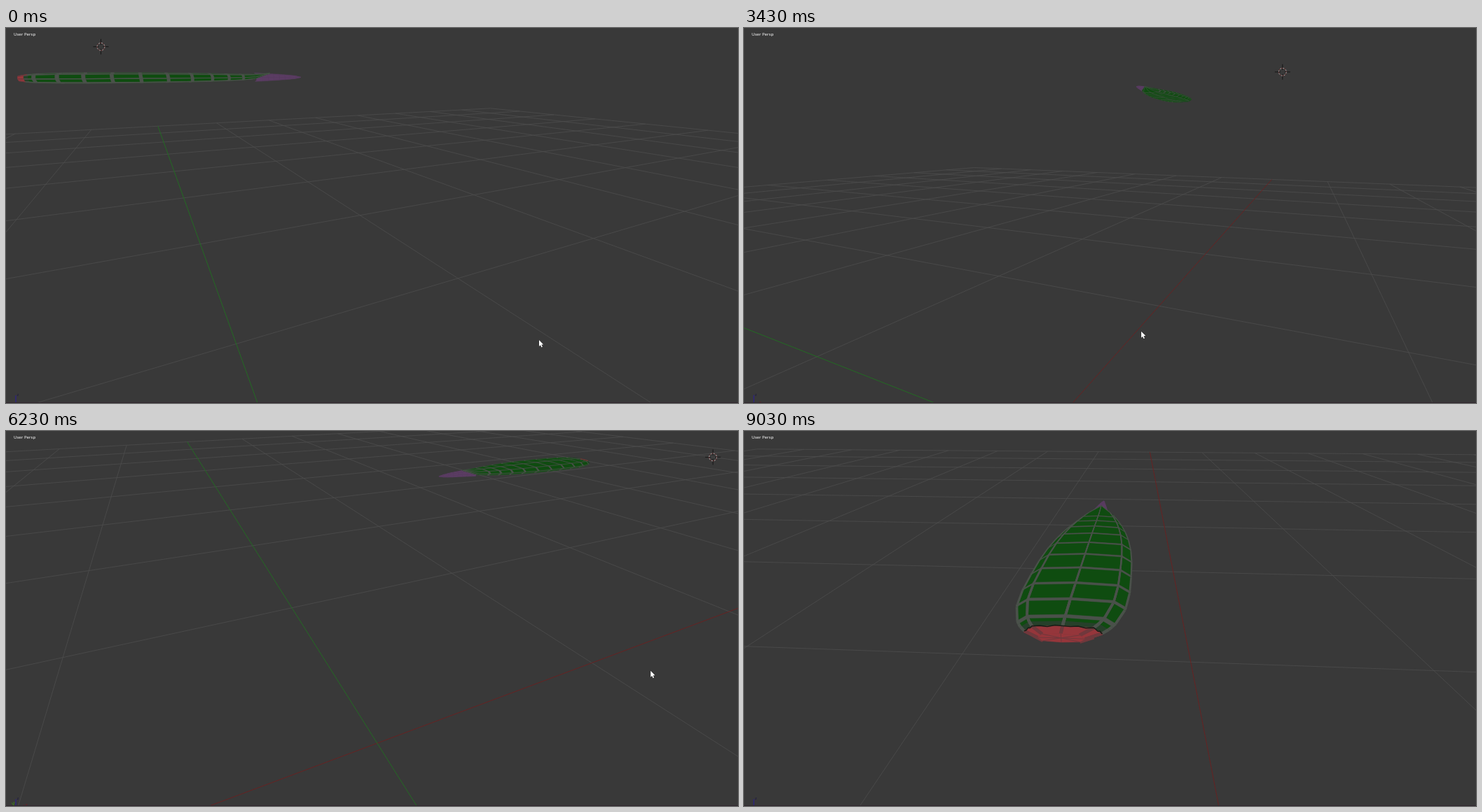
An HTML page with a canvas for the animation above (9380 ms loop, 1045x536 px).

```html
<!DOCTYPE html>
<html lang="en">
<head>
<meta charset="utf-8">
<title>Viewport orbit</title>
<style>
html, body { margin: 0; width: 100%; height: 100%; overflow: hidden; background: #393939; }
canvas { display: block; }
</style>
</head>
<body>
<canvas id="stage" width="1045" height="536"></canvas>
<script>
const ctx = document.getElementById('stage').getContext('2d');
const LOOP = 9380, STEP = 70, FOCAL = 571.5, CX = 522.5, CY = 276, NEAR = 0.01;
const PIVOT = [-0.16, -0.295, 0.663], DIST = 0.672;
const CURSOR = [0.186, -0.523, 0.934];
const GREEN = '#0f4c10', GREY = '#4a514a', PURPLE = '#5b3c63', RED = '#95363b', DARK_RED = '#70383c';

// time, yaw, pitch of the orbiting view
const KEYS = [
  [0, 241.35, 20.35], [1260, 357.3, 26.47], [1960, 377, 25.2], [2310, 388.85, 12.6],
  [3430, 385.8, 11.55], [3990, 394, 29], [4900, 401, 32.1], [5950, 401, 32.1],
  [7000, 488.8, 30.33], [7840, 543.5, 30.07], [LOOP, 543.5, 30.07]
];
const PAUSES = [[2940, 3080], [3990, 4200], [4620, 4760]];

const lerp = (a, b, k) => a.map((v, i) => v + (b[i] - v) * k);
const ramp = (t, from, to) => Math.min(1, Math.max(0, (t - from) / (to - from)));
const softPow = (v, e) => Math.sign(v) * Math.abs(v) ** e;

function viewAt(t) {
  const pause = PAUSES.find(([a, b]) => t > a && t <= b);
  if (pause) t = pause[0];
  const n = Math.max(1, KEYS.findIndex(k => k[0] >= t));
  const a = KEYS[n - 1], b = KEYS[n];
  return lerp(a, b, ramp(t, a[0], b[0])).slice(1);
}

let eye, right, up, forward;
const dot = (a, b) => a[0] * b[0] + a[1] * b[1] + a[2] * b[2];

function aim(yaw, pitch) {
  const a = yaw * Math.PI / 180, b = pitch * Math.PI / 180;
  const c = Math.cos(a), s = Math.sin(a), cp = Math.cos(b), sp = Math.sin(b);
  forward = [c * cp, s * cp, -sp];
  right = [s, -c, 0];
  up = [c * sp, s * sp, cp];
  eye = PIVOT.map((v, i) => v - DIST * forward[i]);
}

function toView(p) {
  const d = p.map((v, i) => v - eye[i]);
  return [dot(d, right), dot(d, up), dot(d, forward)];
}
const toScreen = v => [CX + FOCAL * v[0] / v[2], CY - FOCAL * v[1] / v[2], v[2]];
const project = p => toScreen(toView(p));

function trace(points) {
  ctx.beginPath();
  points.forEach(p => ctx.lineTo(p[0], p[1]));
}

function stroke(points, color, width) {
  trace(points);
  ctx.strokeStyle = color;
  ctx.lineWidth = width;
  ctx.stroke();
}

function line3d(p, q, color, width) {
  let a = toView(p), b = toView(q);
  if (a[2] < NEAR && b[2] < NEAR) return;
  if (a[2] > b[2]) [a, b] = [b, a];
  if (a[2] < NEAR) a = lerp(a, b, (NEAR - a[2]) / (b[2] - a[2]));
  stroke([toScreen(a), toScreen(b)], color, width);
}

function drawGrid() {
  for (let i = -8; i <= 8; i++) {
    if (!i) continue;
    line3d([i, -8, 0], [i, 8, 0], '#4d4d4d', 0.8);
    line3d([-8, i, 0], [8, i, 0], '#4d4d4d', 0.8);
  }
  line3d([-8, 0, 0], [8, 0, 0], '#6c2020', 0.9);
  line3d([0, -8, 0], [0, 8, 0], '#217021', 0.9);
}

// Profiles give half width, height scale and lift at a position along x.
function bodyProfile(x) {
  const t = ramp(x, -0.008, 0.251);
  const front = Math.sin(Math.PI / 2 * ramp(t, 0, 0.6)) ** 0.6;
  const shape = front * (1 - ramp(t, 0.6, 1) ** 4) ** 0.4;
  return [0.0345 * shape, shape ** 0.7, 0.005 * Math.exp(-20 * t)];
}
function noseProfile(x) {
  const t = ramp(x, -0.05, 0.012);
  return [0.0095 * t, 0.95 * Math.sqrt(t), 0];
}

// eight points of a rounded, flattened cross-section
function ring(profile, x) {
  const [w, s, lift] = profile(x);
  return Array.from({ length: 8 }, (_, i) => {
    const a = Math.PI * (1 - i / 4);
    const h = softPow(Math.sin(a), 0.7) * (i < 5 ? 0.0057 : 0.005);
    return project([x, -0.295 + w * softPow(Math.cos(a), 0.7), 0.891 + lift + h * s]);
  });
}

// fills a face only when it is turned to the viewer
function face(pts, color) {
  const area = pts.reduce((sum, p, i) => {
    const q = pts[(i + 1) % pts.length];
    return sum + p[0] * q[1] - q[0] * p[1];
  }, 0);
  if (area <= 0) return false;
  trace(pts);
  ctx.closePath();
  ctx.fillStyle = ctx.strokeStyle = color;
  ctx.lineWidth = 0.5;
  ctx.fill();
  ctx.stroke();
  return true;
}

function shell(profile, cuts, colorAt, seam) {
  const rings = cuts.map(x => ring(profile, x)), seams = [];
  for (let n = 0; n + 1 < rings.length; n++) {
    const a = rings[n], b = rings[n + 1];
    a.forEach((p, i) => {
      const j = (i + 1) % a.length;
      if (face([p, a[j], b[j], b[i]], colorAt(n)))
        seams.push([p, b[i]], [a[j], b[j]]);
    });
  }
  if (seam) seams.forEach(s => stroke(s, seam, 0.2 / s[0][2] ** 2));
  return rings[rings.length - 1];
}

function drawObject() {
  shell(noseProfile, Array.from({ length: 9 }, (_, i) => -0.05 + 0.062 * i / 8), () => PURPLE);

  const cuts = [-0.008, 0.014];
  for (let i = 0; i < 10; i++) {
    const x = 0.03 + 0.0222 * i - 0.0075 * Math.sin(Math.PI * i / 5);
    cuts.push(x - 0.0018, x + 0.0018);
  }
  cuts.push(0.239, 0.243);
  const last = cuts.length - 2;
  const rim = shell(bodyProfile, cuts,
    n => n == last ? '#26402a' : n && n % 2 == 0 ? GREY : GREEN, GREY);

  const cap = shell(bodyProfile, [0.243, 0.249], () => RED, DARK_RED);
  if (!face(cap, RED)) return;
  const middle = lerp(cap[2], cap[6], 0.5);
  cap.forEach(p => stroke([middle, p], DARK_RED, 1));
  // ragged dark edge above the cap
  const ragged = Array.from({ length: 17 }, (_, i) => {
    const k = Math.min(3, i >> 2), p = lerp(rim[k], rim[k + 1], i / 4 - k);
    return [p[0], p[1] + Math.sin(i * 2.4)];
  });
  stroke(ragged, '#151d16', 1.6);
}

function drawCursor() {
  const [x, y, depth] = project(CURSOR);
  if (depth < NEAR) return;
  for (const [dx, dy] of [[1, 0], [-1, 0], [0, 1], [0, -1]])
    stroke([[x + 3 * dx, y + 3 * dy], [x + 11 * dx, y + 11 * dy]], '#111', 0.9);
  ctx.lineWidth = 0.8;
  ['#d8d0d0', '#7d2c2c'].forEach((color, i) => {
    ctx.setLineDash([2.1, 2.1]);
    ctx.lineDashOffset = 2.1 * i;
    ctx.strokeStyle = color;
    ctx.beginPath();
    ctx.arc(x, y, 5.4, 0, 2 * Math.PI);
    ctx.stroke();
  });
  ctx.setLineDash([]);
}

function drawOverlay() {
  ctx.fillStyle = '#fff';
  ctx.font = '6.1px "Noto Sans", "Open Sans", sans-serif';
  ctx.fillText('User Persp', 11, 11.4);
  ['#7c1620', '#3f8f14', '#2a1c9c'].forEach((color, i) => {
    const x = 14 + 13.6 * right[i], y = 538 - 13.6 * up[i];
    stroke([[14, 538], [x, y]], color, 1);
    ctx.fillStyle = i == 2 ? '#1c1744' : color;
    ctx.fillText('xyz'[i], x + 1.5, y + 1);
  });
  ctx.fillStyle = '#30262d';
  ctx.fillRect(0, 535, 1045, 1);
}

// The pointer drags the view, and moves freely twice in between.
function drawPointer(t, yaw, pitch) {
  const regrab = ramp(t, 5180, 5950), leave = ramp(t, 8400, 9030);
  const x = 761 - (yaw - 241.35) / 0.745 + 405 * regrab + 263 * leave;
  const y = 446 + (pitch - 20.35) * 1.4 - 119 * regrab + 205 * leave;
  const shape = [[0, 0], [0, 9], [2, 7.2], [3.4, 10.4], [4.9, 9.8], [3.5, 6.6], [6.3, 6.4]];
  trace(shape.map(p => [x + p[0], y + p[1]]));
  ctx.closePath();
  ctx.strokeStyle = '#222';
  ctx.lineWidth = 0.8;
  ctx.stroke();
  ctx.fillStyle = '#fff';
  ctx.fill();
}

function frame(now) {
  const t = Math.floor(now % LOOP / STEP) * STEP;
  const [yaw, pitch] = viewAt(t);
  aim(yaw, pitch);
  ctx.fillStyle = '#393939';
  ctx.fillRect(0, 0, 1045, 536);
  drawGrid();
  drawObject();
  drawCursor();
  drawOverlay();
  drawPointer(t, yaw, pitch);
}

const start = performance.now();
function tick() {
  frame(performance.now() - start);
  requestAnimationFrame(tick);
}
tick();
</script>
</body>
</html>
```
